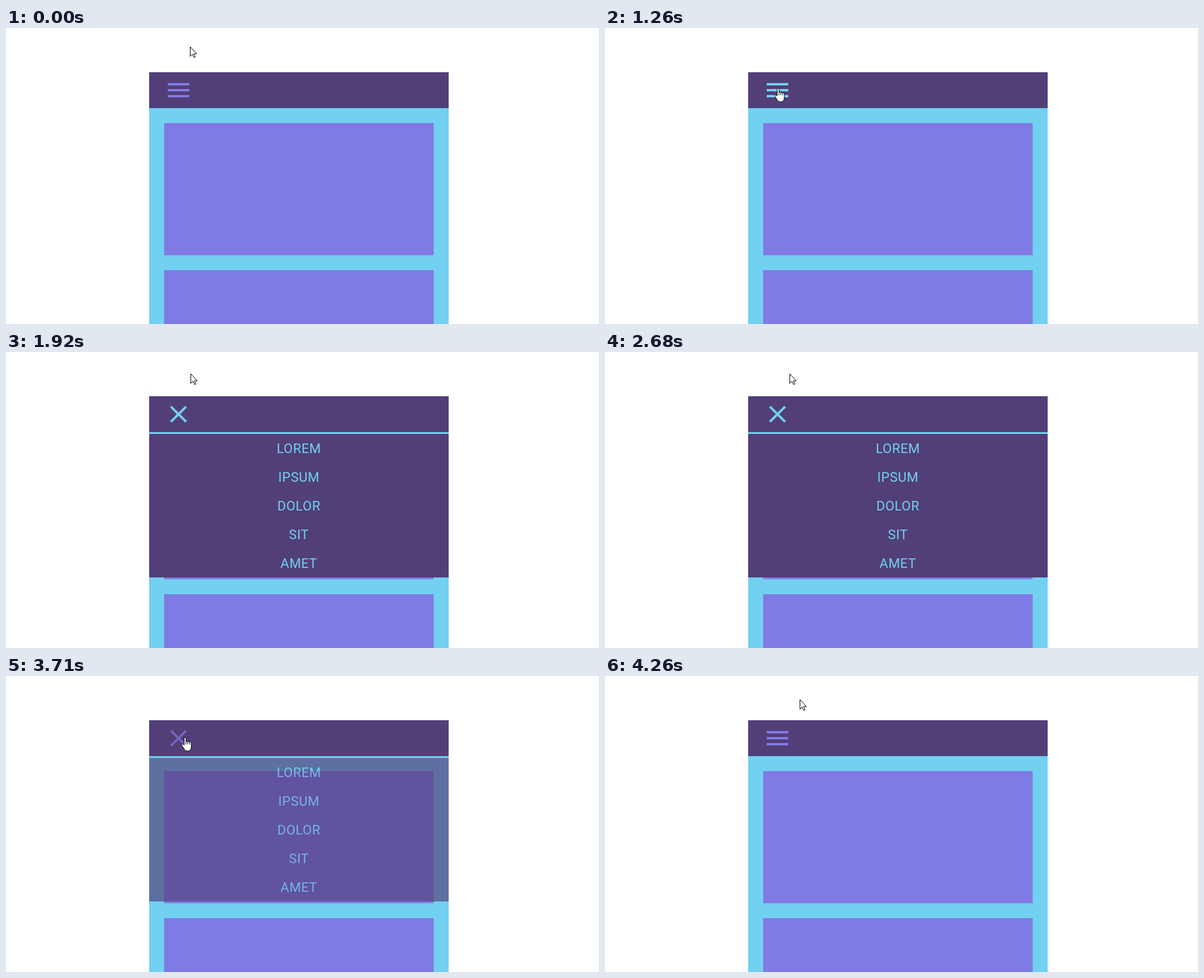
An HTML page that plays this animation: 990x495 px, repeating every 4640 ms.

```html
<!DOCTYPE html>
<html lang="en">
<head>
<meta charset="utf-8">
<title>Menu toggle</title>
<style>
  html, body { margin: 0; width: 100%; height: 100%; overflow: hidden; background: #fff; }
  svg { display: block; }
  .dark { fill: #523f78; }
  .sky { fill: #72d0f0; }
  .violet { fill: #807ae4; }
  text { font: 22px Roboto, sans-serif; letter-spacing: .5px; text-anchor: middle; }
  #bars, #cross { fill: none; stroke-width: 4; }
  #arrow, #hand { fill: #fff; stroke: #000; stroke-linejoin: round; }
</style>
</head>
<body>
<svg width="990" height="495" viewBox="0 0 990 495">
  <rect class="sky" x="239" y="74" width="500" height="421"/>
  <rect class="violet" x="264" y="159" width="450" height="221"/>
  <rect class="violet" x="264" y="405" width="450" height="90"/>
  <rect class="dark" x="239" y="74" width="500" height="60"/>
  <g id="menu">
    <rect class="dark" x="239" y="137" width="500" height="240"/>
    <rect class="sky" x="239" y="134" width="500" height="3"/>
    <g class="sky">
      <text x="489" y="169">LOREM</text>
      <text x="489" y="217">IPSUM</text>
      <text x="489" y="265">DOLOR</text>
      <text x="489" y="313">SIT</text>
      <text x="489" y="361">AMET</text>
    </g>
  </g>
  <path id="bars" d="M270 94h36m-36 10h36m-36 10h36"/>
  <path id="cross" d="M275.3 91.3l25.4 25.4m0-25.4l-25.4 25.4"/>
  <g id="cursor">
    <path id="arrow" d="M.5.5v16L4 13l3 5.5 2-1-2.6-5.3h5z"/>
    <path id="hand" d="M-1.5 13.5V2a1.5 1.5 0 0 1 3 0v6.3a1.5 1.4 0 0 1 3 .5a1.5 1.4 0 0 1 3 .7a1.4 1.3 0 0 1 2.8.9V16q0 7.5-6 7.5q-4 0-5.6-3l-4.5-7q1-3.5 4.3 0zm3-5.2v4m3-3.5v3.5m3-2.8v3"/>
  </g>
</svg>
<script>
const LOOP = 4640, FADE = 180, TINT = 230;
const OPEN = 1256, CLOSE = 3639;
const VIOLET = [128, 122, 228], SKY = [114, 208, 240];

// Each pointer move eases by (dx, dy); bow bends the path sideways.
const START = [307, 31];
const moves = [
  { from: 20, to: 1010, by: [-18, 69], bow: [-28, -26] },
  { from: 1260, to: 1920, by: [19, -64] },
  { from: 2680, to: 3180, by: [-11, 56] },
  { from: 3180, to: 3410, by: [2, 10] },
  { from: 3710, to: 4260, by: [26, -63] }
];

const [menu, bars, cross, cursor, arrow, hand] =
  ['menu', 'bars', 'cross', 'cursor', 'arrow', 'hand'].map(id => document.getElementById(id));

const ramp = (t, start, span) => Math.min(1, Math.max(0, (t - start) / span));
const swing = k => (1 - Math.cos(Math.PI * k)) / 2;
const fade = (t, start) => swing(ramp(t, start, FADE));
const tint = (t, start) => ramp(t, start, TINT);
const blend = k => `rgb(${VIOLET.map((v, i) => v + (SKY[i] - v) * k)})`;

const pointerAt = t => START.map((origin, axis) =>
  Math.round(moves.reduce((pos, { from, to, by, bow = [0, 0] }) => {
    const k = swing(ramp(t, from, to - from));
    return pos + by[axis] * k + bow[axis] * 4 * k * (1 - k);
  }, origin)));

function draw(t) {
  menu.style.opacity = fade(t, OPEN) - fade(t, CLOSE);

  // The outgoing icon fades fully before the other one appears.
  bars.style.opacity = 1 - fade(t, OPEN) + fade(t, CLOSE + FADE);
  cross.style.opacity = fade(t, OPEN + FADE) - fade(t, CLOSE);

  // Hovering swaps the icon colour.
  bars.style.stroke = blend(tint(t, 745) - tint(t, 4000));
  cross.style.stroke = blend(tint(t, 1640) - tint(t, 3000));

  const [x, y] = pointerAt(t), over = y > 76;
  cursor.setAttribute('transform', `translate(${x} ${y})`);
  arrow.style.display = over ? 'none' : '';
  hand.style.display = over ? '' : 'none';
}

function tick() {
  draw(performance.now() % LOOP);
  requestAnimationFrame(tick);
}
tick();
</script>
</body>
</html>
```
